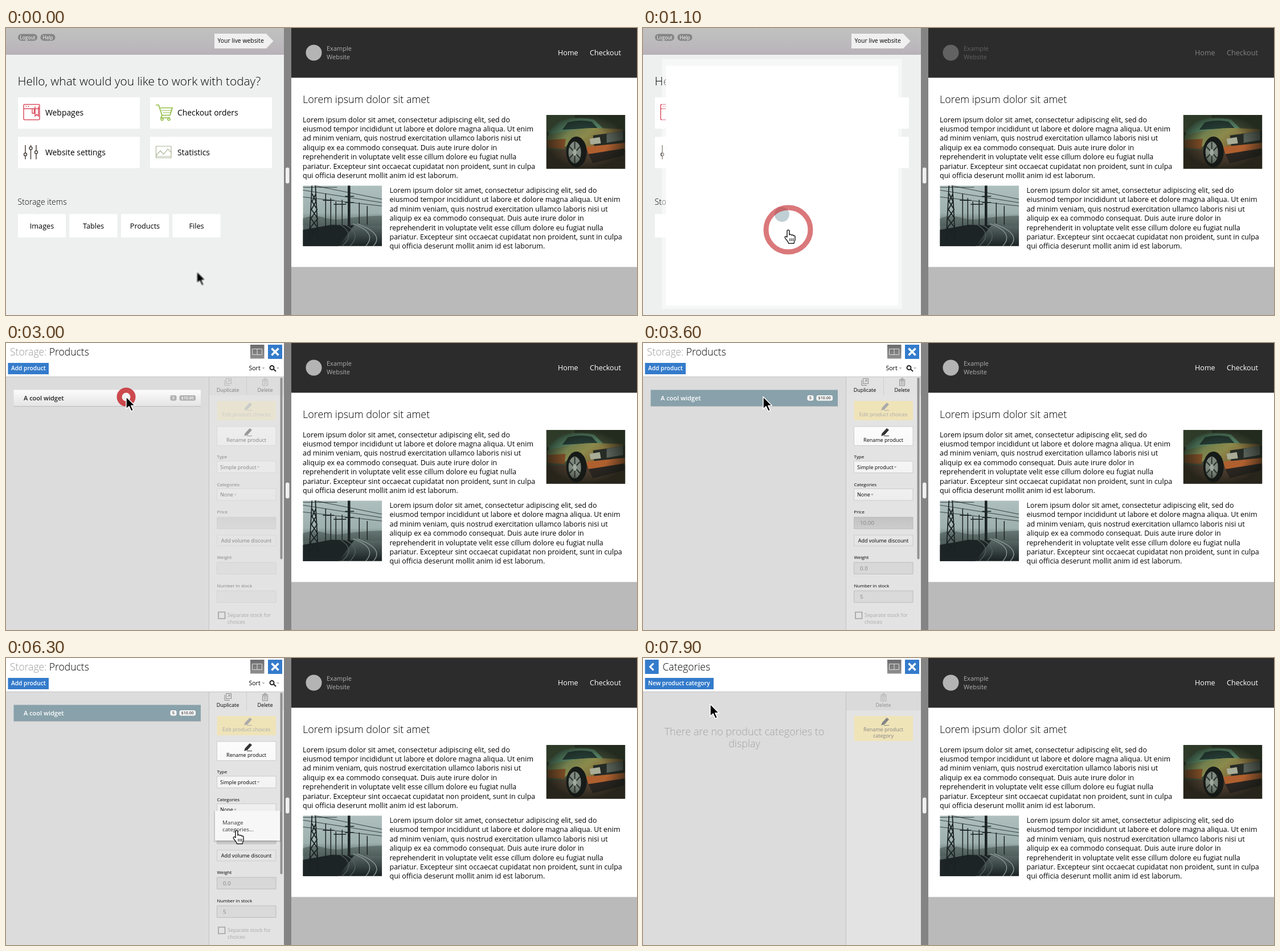
Animation of 1108 by 505 pixels, one loop 8000 ms. Source, as an HTML page:

```html
<!DOCTYPE html>
<html lang="en">
<head>
<meta charset="utf-8">
<title>Storage products</title>
<style>
html, body { margin: 0; width: 100%; height: 100%; overflow: hidden; }
svg { display: block; font-family: "Open Sans", "Noto Sans", sans-serif; }
.light { font-weight: 300; }
.semi { font-weight: 600; font-size: 10.2px; fill: #fff; }
.mid { text-anchor: middle; }
.card { font-size: 13.9px; }
.item { font-size: 12.7px; text-anchor: middle; }
.small { font-size: 9px; }
.label { font-size: 8px; }
.value { font-size: 9.8px; fill: #858585; }
.title { font-size: 17.5px; font-weight: 300; }
.line { fill: none; stroke: #000; }
.btn { fill: url(#btn); stroke: #c4c4c4; stroke-width: .8; }
.field { fill: url(#field); stroke: #b4b4b4; stroke-width: .8; }
.yellow { fill: #efe3b8; }
.blue { fill: #347bcb; }
.badge { font-size: 7px; font-weight: 600; text-anchor: middle; }
</style>
</head>
<body>
<svg width="1108" height="505" viewBox="0 0 1108 505">
<defs>
  <linearGradient id="btn" x2="0" y2="1"><stop stop-color="#fcfcfc"/><stop offset="1" stop-color="#e4e4e4"/></linearGradient>
  <linearGradient id="field" x2="0" y2="1"><stop stop-color="#c2c2c2"/><stop offset=".25" stop-color="#d6d6d6"/><stop offset="1" stop-color="#dadada"/></linearGradient>
  <linearGradient id="strip" x2="0" y2="1"><stop stop-color="#c1c1c1"/><stop offset=".5" stop-color="#bdbbbd"/><stop offset="1" stop-color="#b9b2b9"/></linearGradient>
  <linearGradient id="grey" x2="0" y2="1"><stop stop-color="#6c6c6c"/><stop offset="1" stop-color="#909090"/></linearGradient>
  <linearGradient id="fog" x2="0" y2="1"><stop stop-color="#aebfbe"/><stop offset=".45" stop-color="#9db0ae"/><stop offset=".65" stop-color="#5a6967"/><stop offset="1" stop-color="#192022"/></linearGradient>
  <linearGradient id="hood" x2="1" y2=".5"><stop stop-color="#50704f"/><stop offset=".5" stop-color="#8b8a4c"/><stop offset="1" stop-color="#7a4a28"/></linearGradient>
  <radialGradient id="vignette"><stop offset=".55" stop-color="#151a14" stop-opacity="0"/><stop offset="1" stop-color="#10150f" stop-opacity=".6"/></radialGradient>
  <clipPath id="carBox"><path d="M0 0h138.500v94.500H0z"/></clipPath>
  <clipPath id="railBox"><path d="M0 0h139v106.500H0z"/></clipPath>
  <text id="para" font-size="12.5">
    <tspan x="0">Lorem ipsum dolor sit amet, consectetur adipiscing elit, sed do</tspan>
    <tspan x="0" dy="16.4">eiusmod tempor incididunt ut labore et dolore magna aliqua. Ut enim</tspan>
    <tspan x="0" dy="16.4">ad minim veniam, quis nostrud exercitation ullamco laboris nisi ut</tspan>
    <tspan x="0" dy="16.4">aliquip ex ea commodo consequat. Duis aute irure dolor in</tspan>
    <tspan x="0" dy="16.4">reprehenderit in voluptate velit esse cillum dolore eu fugiat nulla</tspan>
    <tspan x="0" dy="16.4">pariatur. Excepteur sint occaecat cupidatat non proident, sunt in culpa</tspan>
    <tspan x="0" dy="16.4">qui officia deserunt mollit anim id est laborum.</tspan>
  </text>
  <g id="pencil"><path d="M0 13.500l2-5L10 0l4 3-8 9z"/><path d="M5 13.500h9" stroke="currentColor"/></g>
  <g id="bin" class="line" style="stroke:#888"><path d="M1 3h11M5 3V.700h3V3M2 5h9v8.500H2zM5 6v6M8 6v6"/></g>
  <g id="tools">
    <path d="M429 3h24.500v24.500h-24.500z" fill="url(#grey)"/>
    <path d="M432.500 10.500h17v10h-17zM441 10.500v10" class="line" style="stroke:#ddd"/>
    <path d="M460 3h25v25h-25z" class="blue"/>
    <path d="M466.500 9.500l12 12m0-12l-12 12" class="line" style="stroke:#fff;stroke-width:3.500"/>
  </g>
  <g id="frame">
    <path d="M0 0h488v505H0z" fill="#fff"/>
    <path d="M0 59h488v446H0z" fill="#dcdcdc"/>
    <path d="M356 59h132v446H356z" fill="#e3e3e3"/>
    <path d="M357 60h131v32H357z" fill="#dadada"/>
    <path d="M0 59.500h488M356.500 59v446" class="line" style="stroke:#c3c3c3"/>
    <use href="#tools"/>
  </g>
</defs>

<!-- live website -->
<path d="M501 0h607v505H501z" fill="#bababa"/>
<path d="M501 87h607v333.500H501z" fill="#fff"/>
<path d="M501 0h607v87.500H501z" fill="#2c2c2c"/>
<g id="siteHead">
  <circle cx="540.500" cy="43.500" r="14" fill="#b4b4b4"/>
  <text font-size="11" fill="#b0b0b0"><tspan x="563" y="39.500">Example</tspan><tspan x="563" y="55.300">Website</tspan></text>
  <g font-size="12.6" fill="#fff"><text x="969" y="47.500">Home</text><text x="1025" y="47.500">Checkout</text></g>
</g>
<text class="light" x="521" y="132" font-size="18">Lorem ipsum dolor sit amet</text>
<use href="#para" x="521" y="165.700"/>
<use href="#para" x="673.500" y="290"/>

<g transform="translate(948.700 153)" clip-path="url(#carBox)">
  <path d="M0 0h139v95H0z" fill="#3f4a35"/>
  <path d="M0 0h50v30H0z" fill="#5d7350"/>
  <path d="M0 62h139v33H0z" fill="#4a3b2d"/>
  <path d="M4 28L24 11Q52 2 84 8L100 24 60 32 6 40z" fill="#5b8a6b"/>
  <path d="M28 26L38 13Q60 7 80 12L90 23z" fill="#243a33"/>
  <path d="M2 36Q50 22 88 23L134 25 136 62 92 74 74 66 66 46 48 40 34 56 2 54z" fill="url(#hood)"/>
  <path d="M2 44L34 42 32 60 2 58z" fill="#7a4a25"/>
  <path d="M82 36L138 28V50L84 55z" fill="#262b25"/>
  <path d="M106 33l29-5v16l-29 5z" fill="#59625a"/>
  <path d="M76 42l18-3 2 11-18 2z" fill="#a9ad98"/>
  <path d="M70 56l68-7v10l-64 10z" fill="#b0602f"/>
  <path d="M74 69l63-10v12L82 85z" fill="#2b2521"/>
  <ellipse cx="53" cy="65" rx="18" ry="27" fill="#161a18"/>
  <ellipse cx="50" cy="66" rx="11" ry="19" fill="#7f897f"/>
  <path d="M50 48v36M41 56l18 20M59 56L41 76" class="line" style="stroke:#2c332e;stroke-width:2"/>
  <ellipse cx="50" cy="66" rx="3.500" ry="6" fill="#a0a79c"/>
  <path d="M0 0h139v95H0z" fill="url(#vignette)"/>
</g>

<g transform="translate(521.300 277.300)" clip-path="url(#railBox)">
  <path d="M0 0h139v107H0z" fill="url(#fog)"/>
  <path d="M0 58q18-8 36-2t40 2 63-5v18H0z" fill="#4c5a58" opacity=".6"/>
  <path d="M0 107V78l50-9 40 1-28 37z" fill="#1d2425"/>
  <g class="line" style="stroke:#1b2223">
    <path d="M0 8l139 22M0 20l139 16M20 0l119 24M0 3h60" stroke-width=".8"/>
    <path d="M11 97L16 0M27 97L22 0M12 90l14-16-12-16 11-16-9-14 7-14M26 90L13 74l13-16-11-16 8-14-7-14" stroke-width="1.800"/>
    <path d="M40 75V14M49 72V22M58 70V28M69 70V25M35 26h20M54 33h22" stroke-width="1.500"/>
    <path d="M81 72V0" stroke-width="4.500"/><path d="M74 19h16M74 30h16M99 67V30M113 69V36" stroke-width="1.500"/>
  </g>
  <g class="line" style="stroke:#8d9a98;stroke-width:1.300">
    <path d="M88 67q44 16 22 40M95 67q50 18 28 40"/>
    <path d="M72 68q34 16 10 39M66 69q28 17 2 38" stroke="#566260"/>
  </g>
</g>

<!-- start screen -->
<path d="M0 0h488v505H0z" fill="#eef0f0"/>
<path d="M0 0h488v47H0z" fill="url(#strip)"/>
<path d="M0 46.500h488" class="line" style="stroke:#b1abb1"/>
<g fill="#858585"><rect x="21" y="10.500" width="34" height="12" rx="6"/><rect x="60.500" y="10.500" width="26" height="12" rx="6"/></g>
<g font-size="8.300" fill="#fff" class="mid"><text x="38" y="19.700">Logout</text><text x="73.500" y="19.700">Help</text></g>
<path d="M366 10h91l12.500 13L457 36h-91z" fill="#f0f0f0"/>
<text x="371.500" y="26.300" font-size="10.400">Your live website</text>
<text class="light" x="20.500" y="101" font-size="20.800">Hello, what would you like to work with today?</text>
<path d="M21 122h214v55H21zM253 122h214v55H253zM21 191.500h214v55H21zM253 191.500h214v55H253zM21 327.500h84v41H21zM111.500 327.500h84v41h-84zM202 327.500h84v41h-84zM292.500 327.500h84v41h-84z" fill="#fff"/>
<g class="card">
  <text x="69" y="154">Webpages</text><text x="301" y="154">Checkout orders</text>
  <text x="69" y="223.700">Website settings</text><text x="301" y="223.700">Statistics</text>
</g>
<path d="M33 134.500h24q2 0 2 2v23q0 2-2 2H33q-2 0-2-2v-23q0-2 2-2zM31 142h28M34.500 138h2m2 0h2M46 142v8h3.500v-8M51 138v17l3-3 3 3v-17" class="line" style="stroke:#d9505f;stroke-width:1.500"/>
<path d="M263 135.500h5l6 18h14l4-13h-21M274 153.500l-2 4.500h16" class="line" style="stroke:#8fbd42;stroke-width:1.700"/>
<path d="M273 145h17M276 149h13" class="line" style="stroke:#8fbd42"/>
<g class="line" style="stroke:#8fbd42;stroke-width:1.500"><circle cx="274" cy="160.500" r="2"/><circle cx="286" cy="160.500" r="2"/></g>
<g class="line" style="stroke:#453c35;stroke-width:1.400">
  <path d="M34 206v14m0 5v6M43.500 206v3m0 5v17M53 206v10m0 5v10"/>
  <circle cx="34" cy="222.500" r="2.500"/><circle cx="43.500" cy="211.500" r="2.500"/><circle cx="53" cy="218.500" r="2.500"/>
</g>
<path d="M263.500 208h26.500v20.500h-26.500zM264 224l7-8 6 6 7-9 6 6M264 226h26" class="line" style="stroke:#aeb69a;stroke-width:1.200"/>
<text class="light" x="20.500" y="310.700" font-size="14">Storage items</text>
<g class="item"><text x="63" y="352.800">Images</text><text x="153.500" y="352.800">Tables</text><text x="244" y="352.800">Products</text><text x="334.500" y="352.800">Files</text></g>

<!-- opening window -->
<g id="opening">
  <rect id="halo" fill="#fff" opacity=".45"/><rect id="sheet" fill="#fff"/>
  <circle id="loader" cx="244" cy="328" r="13" fill="#7fa0a9"/>
</g>

<!-- product list -->
<g id="products">
  <use href="#frame"/>
  <text class="title" x="7" y="21.700"><tspan fill="#999">Storage:</tspan> Products</text>
  <path d="M3.500 35h71.500v20H3.500z" class="blue"/><text class="semi" x="9" y="48">Add product</text>
  <text x="426.500" y="48" font-size="10.500">Sort</text>
  <path d="M449.500 43h5l-2.500 3zM475 43h5l-2.500 3z" fill="#b5b5b5"/>
  <path d="M470 46l4 4M470.500 43.500a3.500 3.500 0 1 1-7 0 3.500 3.500 0 1 1 7 0z" class="line" style="stroke:#222;stroke-width:2"/>
  <path d="M13.500 111.500h329" class="line" style="stroke:#bbb"/>
  <rect id="row" x="13.500" y="82.500" width="328.500" height="28.500"/>
  <text id="rowText" x="31" y="101" font-size="11" font-weight="600">A cool widget</text>
  <g id="badges"><rect x="288.500" y="92" width="11" height="9.500" rx="3"/><rect x="304.500" y="92" width="28.500" height="9.500" rx="3"/></g>
  <g id="badgeText" class="badge"><text x="294" y="99.400">5</text><text x="318.700" y="99.400">$10.00</text></g>
  <path d="M422.500 60v32" class="line" style="stroke:#cfcfcf"/>
  <g id="side">
    <path d="M357 60h65v32h-65zM423 60h58v32h-58z" fill="#e2e2e2"/>
    <path d="M386.500 62.500h9v9h-9zM384 65v9.500h9M389 69l4-4m-3 0h3v3" class="line" style="stroke:#888"/>
    <use href="#bin" x="448.500" y="61.500"/>
    <g class="small mid"><text x="389.500" y="86">Duplicate</text><text x="455" y="86">Delete</text></g>
    <path d="M370.500 102h103.500v34H370.500z" class="yellow"/>
    <g fill="#aaa" color="#aaa"><use href="#pencil" x="418" y="105"/><text class="small mid" x="422" y="129.300">Edit product choices</text></g>
    <path d="M370.500 147h103.500v33.500H370.500zM370.500 208h103.500v20.500H370.500zM370.500 256.500h103.500v20.500H370.500zM370.500 338h103.500v19H370.500z" class="btn"/>
    <g fill="#333" color="#333"><use href="#pencil" x="418" y="150"/></g>
    <g class="small"><text class="mid" x="422" y="174">Rename product</text><text x="376" y="221.800">Simple product</text><text x="376" y="270.300">None</text><text class="mid" x="422" y="350.600">Add volume discount</text></g>
    <path d="M440.500 217h5l-2.500 3zM400 265.500h5l-2.500 3z" fill="#aaa"/>
    <g class="label"><text x="370.500" y="203">Type</text><text x="370.500" y="251.500">Categories</text><text x="370.500" y="299.700">Price</text><text x="370.500" y="379.500">Weight</text><text x="370.500" y="429.500">Number in stock</text></g>
    <path d="M370.500 306.500h103.500v20.500H370.500zM370.500 386h103.500v20.500H370.500zM370.500 436h103.500v20.500H370.500z" class="field"/>
  </g>
  <g id="values" class="value"><text x="381" y="320.300">10.00</text><text x="381" y="400">0.0</text><text x="381" y="450">5</text></g>
  <path d="M373 473.500h11.500v11.500H373z" class="line" style="stroke:#a3a3a3;stroke-width:1.700"/>
  <text class="small" fill="#aaa"><tspan x="389" y="482">Separate stock for</tspan><tspan x="389" y="493.500">choices</tspan></text>
  <rect x="481.500" y="61" width="4" height="319.500" rx="2" fill="#929292"/>
  <g id="menu">
    <rect x="365" y="269" width="118" height="55" rx="2" opacity=".12"/>
    <rect x="367" y="269" width="114" height="52" fill="#f7f7f7"/>
    <text font-size="9.800" fill="#333"><tspan x="380" y="293">Manage</tspan><tspan x="380" y="305">categories...</tspan></text>
  </g>
</g>

<!-- category list -->
<g id="categories">
  <use href="#frame"/>
  <path d="M3.500 3h24v25h-24zM3.500 35h120.500v20H3.500z" class="blue"/>
  <path d="M18.500 9.500l-6 6 6 6" class="line" style="stroke:#fff;stroke-width:3"/>
  <text class="title" x="34.500" y="21.700">Categories</text>
  <text class="semi" x="9" y="48">New product category</text>
  <text class="light mid" font-size="18" fill="#a3a3a3"><tspan x="178" y="135.500">There are no product categories to</tspan><tspan x="178" y="157">display</tspan></text>
  <use href="#bin" x="416" y="62" opacity=".5"/>
  <text class="small mid" x="422" y="86" fill="#8d8d8d">Delete</text>
  <path d="M370.500 102h103.500v44H370.500z" class="yellow"/>
  <g fill="#858585" color="#858585"><use href="#pencil" x="418" y="105"/><text class="small mid"><tspan x="422" y="129.300">Rename product</tspan><tspan x="422" y="140">category</tspan></text></g>
</g>

<path d="M488 0h13v505h-13z" fill="#848484"/>
<rect x="491" y="245.500" width="6.500" height="28" rx="3" fill="#f0f0f0"/>
<circle id="ring" fill="none" stroke="#c8383c" stroke-width="9"/>
<g id="pointer" stroke-linejoin="round">
  <path id="arrow" d="M0 0V21.500L5 17l4 8.500 3.500-1.500-3.700-8.300H15.500z" stroke="#fff" stroke-width="1.500"/>
  <g id="hand" transform="translate(-9 -1)" fill="#fff" stroke="#222" stroke-width="1.500">
    <path d="M7 14V3.500a2 2 0 0 1 4 0V10a2 2 0 0 1 3.600.600 2 2 0 0 1 3.400.900 2 2 0 0 1 3 1.700V18c0 3-2 4-2 7H9.500c0-3-4-6-6-9.500-1-2 1-3.500 2.500-2.200z"/>
    <path d="M12 16v5m3-5v5m2.800-5v5" stroke-width="1.200"/>
  </g>
</g>
</svg>
<script>
const LOOP = 8000, STEP = 100;
const path = [
  [0, 335, 428], [800, 255, 355], [1400, 255, 355], [1800, 237, 333],
  [2300, 209, 190], [2500, 203, 125], [2700, 211, 100], [2800, 211, 94.5],
  [3900, 211, 94.5], [4800, 366, 253], [5200, 388, 262], [5900, 388, 262],
  [6300, 405, 303], [7200, 405, 303], [7500, 274, 243], [7900, 118, 81], [LOOP, 118, 81]
];
const headFade = [[0, 1], [900, 1], [1100, .4], [1700, 1], [LOOP, 1]];
const clicks = [[800, 255, 355], [3000, 211, 95], [6700, 405, 304]];

const $ = id => document.getElementById(id);
const set = (id, attrs) => {
  for (const name in attrs) $(id).setAttribute(name, attrs[name]);
};
const fade = (id, opacity) => set(id, { opacity, visibility: opacity > 0 ? "visible" : "hidden" });
const ramp = (t, from, to) => Math.min(1, Math.max(0, (t - from) / (to - from)));
const within = (t, from, to) => t >= from && t < to;

function track(keys, t) {
  const i = Math.max(1, keys.findIndex(k => k[0] >= t));
  const a = keys[i - 1], b = keys[i], p = ramp(t, a[0], b[0]);
  return a.slice(1).map((v, j) => v + (b[j + 1] - v) * p);
}

function drawOpening(t) {
  const scale = Math.min(1, .835 + (t - 1100) * .00165);
  const w = 488 * scale, h = 505 * scale;
  const x = 244 - w / 2, y = 252.5 + 25 * (1 - ramp(t, 1100, 1200)) - h / 2;
  set("sheet", { x, y, width: w, height: h });
  set("halo", { x: x - 7, y: y - 12, width: w + 14, height: h + 18 });
  fade("loader", within(t, 1100, 1600) ? .5 : 0);
  fade("opening", within(t, 1000, 1800) ? ramp(t, 900, 1100) : 0);
}

function drawRing(t) {
  const click = clicks.find(c => within(t, c[0], c[0] + 600));
  if (!click) return fade("ring", 0);
  const age = (t - click[0]) / 600;
  set("ring", { cx: click[1], cy: click[2], r: 12 + 54 * age });
  fade("ring", Math.min(.9, 1.35 * (1 - age)));
}

function drawPointer(t) {
  const [x, y] = track(path, t), [nx, ny] = track(path, Math.min(LOOP, t + STEP / 2));
  const speed = Math.hypot(nx - x, ny - y);
  set("pointer", { transform: `translate(${x} ${y})` });
  $("pointer").style.filter = speed > 3 ? "blur(1px)" : "none";
  const hand = within(t, 800, 1300) || within(t, 4900, 6700);
  fade("hand", hand ? 1 : 0);
  fade("arrow", hand ? 0 : 1);
}

function draw(t) {
  drawOpening(t);
  drawRing(t);
  drawPointer(t);
  fade("siteHead", track(headFade, t)[0]);
  fade("products", ramp(t, 1300, 1600));
  fade("categories", ramp(t, 6600, 6900));
  fade("menu", t < 6800 ? ramp(t, 5350, 5700) : 0);

  const selected = t >= 3100;
  set("row", { fill: selected ? "#88a1aa" : "url(#btn)" });
  set("rowText", { fill: selected ? "#fff" : "#222" });
  set("badges", { fill: selected ? "#f8f8f8" : "#b0b0b0" });
  set("badgeText", { fill: selected ? "#444" : "#fff" });
  const active = ramp(t, 3000, 3400);
  set("side", { opacity: .42 + .58 * active });
  fade("values", active);
}

function tick(now) {
  draw(Math.floor(now % LOOP / STEP) * STEP);
  requestAnimationFrame(tick);
}
draw(0);
requestAnimationFrame(tick);
</script>
</body>
</html>
```
